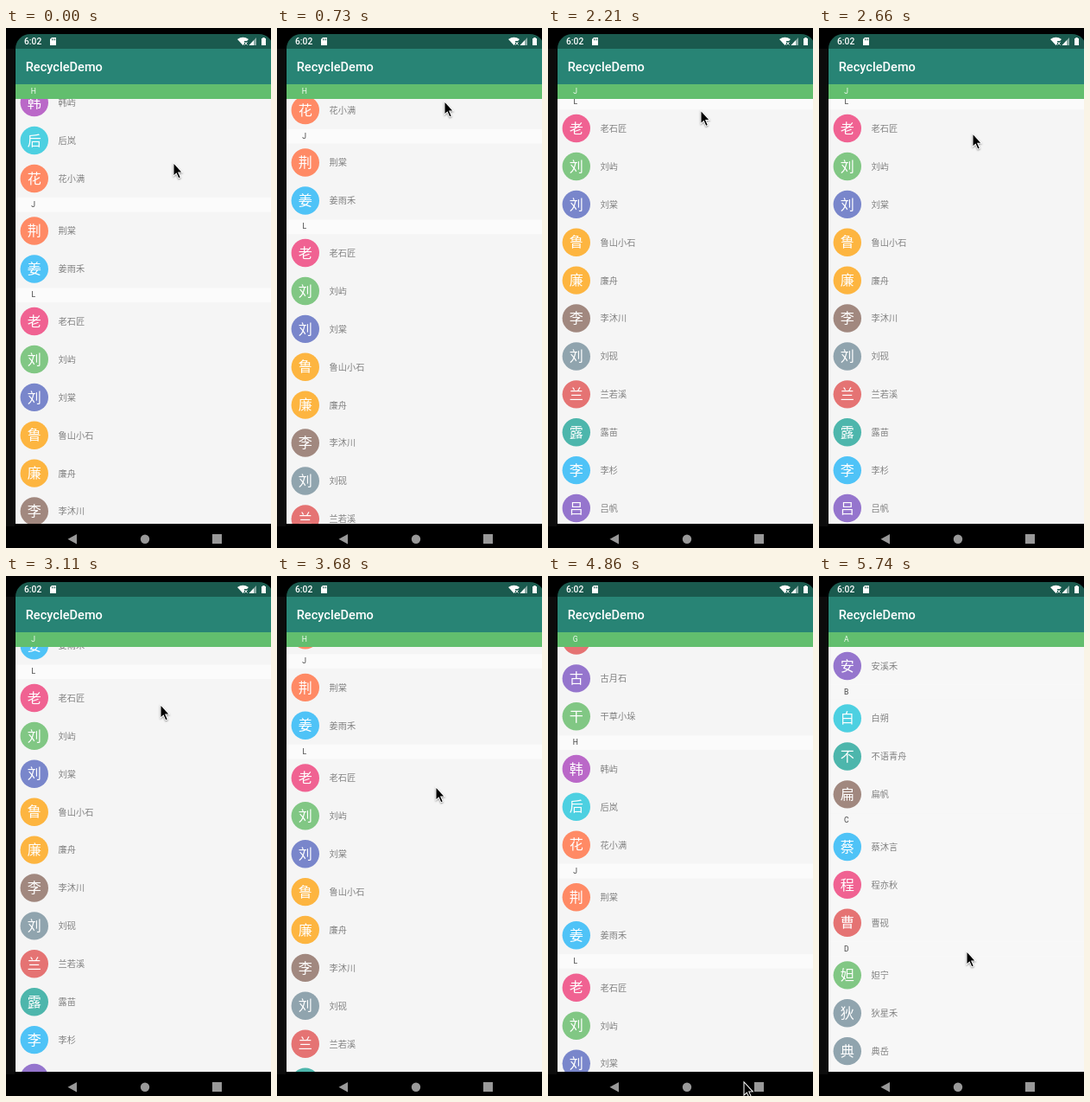
An HTML page with a canvas for the animation above (5.84 s loop, 307x601 px).

```html
<!DOCTYPE html>
<html lang="zh">
<head>
<meta charset="utf-8">
<title>RecycleDemo</title>
<style>
  html, body { margin: 0; width: 100%; height: 100%; overflow: hidden; background: #000; }
  canvas { display: block; }
</style>
</head>
<body>
<canvas id="stage" width="307" height="601"></canvas>
<script>
const ctx = document.getElementById('stage').getContext('2d');
const LOOP = 5840, TICK = 147.3;
const LEFT = 11, WIDTH = 296, TOP = 65.3, BOTTOM = 573, HEAD = 16.7, ROW = 43.9;
const LATIN = 'Roboto, sans-serif';
const HAN = '"Noto Sans CJK SC", "Noto Sans CJK", sans-serif';
const DARK_TEAL = '#1a5a4e', GREY = '#999';

const COLORS = {
  r: '#e57373', p: '#f06292', v: '#ba68c8', d: '#9575cd', i: '#7986cb', b: '#4fc3f7',
  c: '#4dd0e1', t: '#4db6ac', g: '#81c784', y: '#fdb540', o: '#ff8a65', n: '#a1887f', s: '#90a4ae'
};

// One line per section: letter, then names with a colour key.
const SECTIONS = `A 安溪禾d
B 白朔c 不语青舟t 扁帆n
C 蔡沐言b 程亦秋p 曹砚r
D 妲宁g 狄星禾s 典岳s 达岚y 东篱小雨i 大苗p
G 高远帆o 关杉t 宫野青木r 古月石d 干草小垛g
H 韩屿v 后岚c 花小满o
J 荆棠o 姜雨禾b
L 老石匠p 刘屿g 刘棠i 鲁山小石y 廉舟y 李沐川n 刘砚s 兰若溪r 露苗t 李杉b 吕帆d`;

const items = [];
let end = 0;
for (const line of SECTIONS.split('\n')) {
  const [letter, ...names] = line.split(' ');
  items.push({ letter, y: end });
  end += HEAD;
  for (const entry of names) {
    items.push({ name: entry.slice(0, -1), color: COLORS[entry.slice(-1)], y: end });
    end += ROW;
  }
}

const clamp = (v, lo, hi) => Math.min(hi, Math.max(lo, v));

// Swipe up, coast, drag back down with growing speed, then fling to the top.
function scrollAt(tick) {
  if (tick >= 38) return 120 * (39 - tick);
  const swipe = 15.8 * Math.min(tick, 8);
  const coast = 96.6 * (1 - (1 - clamp((tick - 8) / 7, 0, 1)) ** 2);
  const u = clamp(tick - 19.75, 0, 14.25);
  return 891.5 + swipe + coast - u * (19.2 + 0.6 * u);
}

// tick, x, y
const POINTER = [
  [0, 194, 156], [5, 194, 85], [8, 192, 48], [15, 177, 95.5], [21, 179, 149],
  [25, 184, 244], [30, 193, 392], [33, 227, 585], [34, 171, 434], [39, 171, 434]
];

function pointerAt(tick) {
  const n = Math.max(1, POINTER.findIndex(key => key[0] >= tick));
  const a = POINTER[n - 1], b = POINTER[n];
  const f = (tick - a[0]) / (b[0] - a[0]);
  return [a[1] + (b[1] - a[1]) * f, a[2] + (b[2] - a[2]) * f];
}

function rect(x, y, w, h, color) {
  ctx.fillStyle = color;
  ctx.fillRect(x, y, w, h);
}

function disc(x, y, r, color) {
  ctx.fillStyle = color;
  ctx.beginPath();
  ctx.arc(x, y, r, 0, Math.PI * 2);
  ctx.fill();
}

function poly(points, color) {
  ctx.fillStyle = color;
  ctx.beginPath();
  points.forEach(([x, y]) => ctx.lineTo(x, y));
  ctx.closePath();
  ctx.fill();
}

function label(str, x, y, font, color, align = 'left') {
  ctx.font = font;
  ctx.fillStyle = color;
  ctx.textAlign = align;
  ctx.fillText(str, x, y);
}

function sectionHead(letter, y, bg, color) {
  rect(LEFT, y, WIDTH, HEAD, bg);
  label(letter, 31.7, y + 11, '8.6px ' + LATIN, color, 'center');
}

function drawList(scroll) {
  const resting = scroll === 0;
  const rowBg = resting ? '#f7f7f7' : '#f5f5f5';
  const headBg = resting ? rowBg : '#fbfbfb';
  ctx.save();
  ctx.beginPath();
  ctx.rect(LEFT, 65, WIDTH, BOTTOM - 65);
  ctx.clip();
  rect(LEFT, 65, WIDTH, BOTTOM - 65, rowBg);
  let current = 'A';
  for (const item of items) {
    const y = TOP + item.y - scroll;
    if (item.letter && y <= TOP) current = item.letter;
    if (y < TOP - ROW || y > BOTTOM) continue;
    if (item.letter) {
      sectionHead(item.letter, y, headBg, '#444');
    } else {
      const mid = y + ROW / 2;
      disc(32.8, mid, 16.2, item.color);
      label(item.name[0], 32.8, mid + 5.7, '16.1px ' + HAN, '#fff', 'center');
      label(item.name, 60.6, mid + 3.9, '10.2px ' + HAN, '#808080');
    }
  }
  rect(LEFT, 65, WIDTH, 1, '#62be6e');
  sectionHead(current, TOP, '#62be6e', '#f2faf2');
  ctx.restore();
}

function drawStatusIcons() {
  poly([[53, 11], [58, 11], [58, 20], [51, 20], [51, 13]], '#fff');
  for (let x = 53; x < 57; x += 1.7) rect(x, 12.3, 0.8, 2, DARK_TEAL);

  ctx.fillStyle = '#fff';
  ctx.beginPath();
  ctx.moveTo(274.5, 20);
  ctx.lineTo(268, 13);
  ctx.quadraticCurveTo(274.5, 8.5, 281, 13);
  ctx.fill();
  rect(276, 15, 5, 5, DARK_TEAL);
  ctx.strokeStyle = '#fff';
  ctx.lineWidth = 1;
  ctx.beginPath();
  ctx.moveTo(276.5, 16); ctx.lineTo(279.5, 19.5);
  ctx.moveTo(279.5, 16); ctx.lineTo(276.5, 19.5);
  ctx.stroke();

  poly([[290, 11], [290, 20], [281.5, 20]], '#8cada7');
  poly([[287, 14.2], [287, 20], [281.5, 20]], '#fff');
  rect(296, 12, 5, 8, '#fff');
  rect(297.3, 11, 2.4, 1, '#fff');
}

function drawPhone() {
  rect(0, 0, 307, 601, '#000');
  rect(0, 24, 10, 552, '#0c0c0c');
  ctx.save();
  ctx.beginPath();
  ctx.roundRect(LEFT, 7, 299, 600, 17);
  ctx.clip();
  rect(LEFT, 7, WIDTH, 18, DARK_TEAL);
  rect(LEFT, 24, WIDTH, 41, '#288475');
  ctx.restore();
  label('6:02', 21, 19.4, '500 10.3px ' + LATIN, '#fff');
  label('RecycleDemo', 22.7, 50, '500 14.6px ' + LATIN, '#fff');
  drawStatusIcons();

  poly([[71.5, 590.7], [82, 585], [82, 596.4]], GREY);
  disc(161, 590.7, 5.2, GREY);
  rect(239, 585, 11, 11, GREY);
}

function drawPointer(x, y) {
  ctx.save();
  ctx.translate(x, y);
  ctx.shadowColor = 'rgba(0,0,0,.35)';
  ctx.shadowBlur = 2;
  ctx.shadowOffsetY = 1;
  ctx.strokeStyle = '#fff';
  ctx.lineWidth = 2;
  poly([[0.5, 1], [0.5, 14], [3.5, 11.2], [6.2, 17.2], [7.7, 16.5], [5, 10.6], [9.2, 10.4]], '#000');
  ctx.stroke();
  ctx.shadowColor = 'transparent';
  ctx.fill();
  ctx.restore();
}

function draw(now) {
  const tick = Math.floor(((now % LOOP) + 12) / TICK);
  drawPhone();
  drawList(scrollAt(tick));
  drawPointer(...pointerAt(tick));
  requestAnimationFrame(() => draw(performance.now() - start));
}

const start = performance.now();
draw(0);
</script>
</body>
</html>
```
